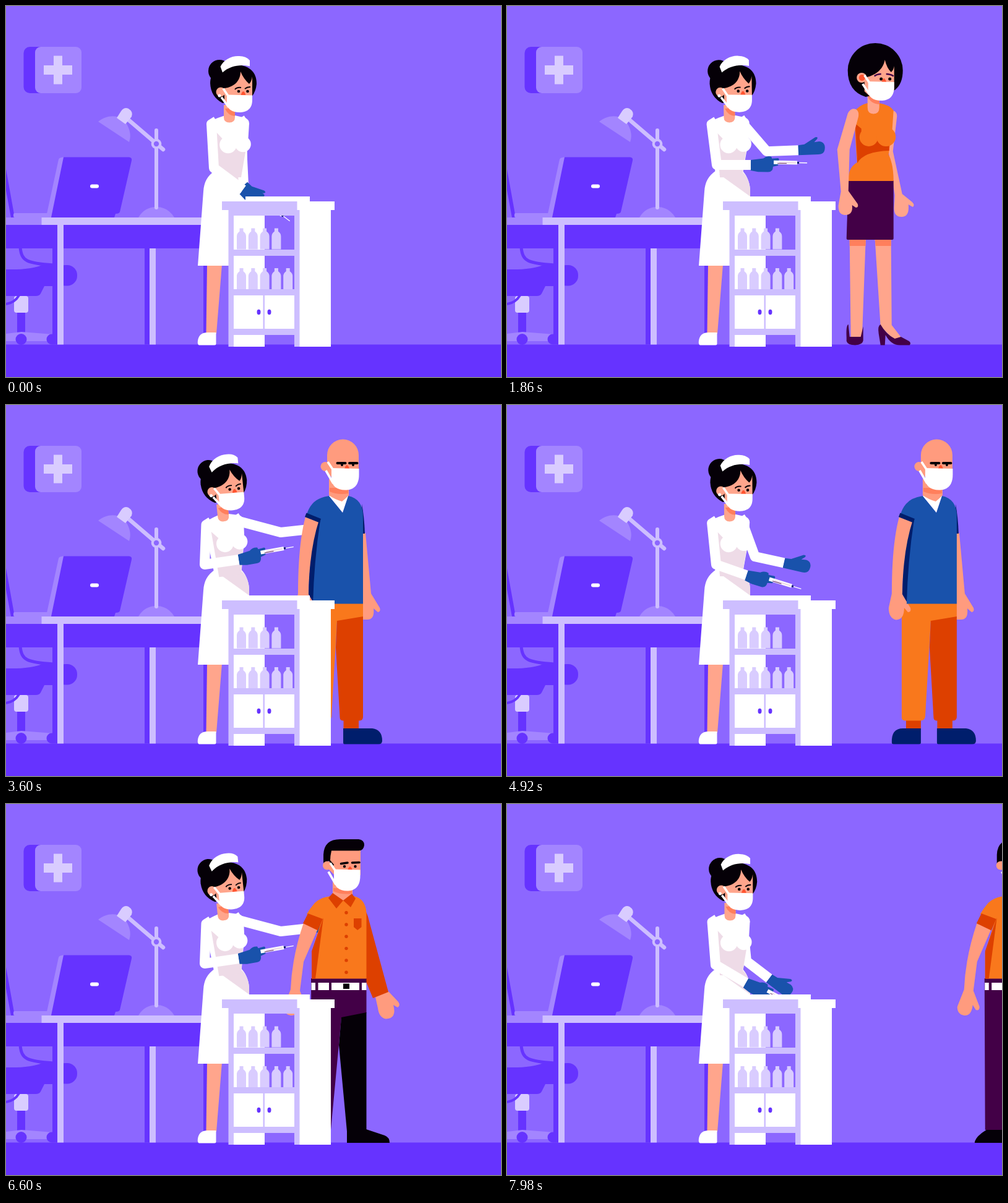
Write an HTML page that moves like this. It is 800x600 px and loops after 8000 ms.

```html
<!DOCTYPE html>
<html lang="en">
<head>
<meta charset="utf-8">
<title>Vaccination room</title>
<style>
html, body { margin: 0; width: 100%; height: 100%; overflow: hidden; background: #8c67ff; }
svg { display: block; width: 100vw; height: 100vh; }
</style>
</head>
<body>
<svg id="stage" viewBox="0 0 800 600"></svg>
<script>
const C = {
  bg: '#8c67ff', dark: '#6633ff', mid: '#a385ff', light: '#cdbeff', pale: '#d9ccff', white: '#fff',
  skin: '#ffa58c', tan: '#ff9b7e', blush: '#ff7f5c', red: '#ff5430', black: '#050007',
  blue: '#1952ab', navy: '#001e6c', orange: '#f9781c', rust: '#dd4000', plum: '#430047', pink: '#eedbe7'
};

const shape = (fill, d) => `<path d="${d}" fill="${fill}"/>`;
const line = (stroke, width, d, cap = 'butt') =>
  `<path d="${d}" fill="none" stroke="${stroke}" stroke-width="${width}" stroke-linecap="${cap}" stroke-linejoin="round"/>`;
const box = (fill, x, y, x2, y2, r = 0) =>
  `<rect x="${x}" y="${y}" width="${x2 - x}" height="${y2 - y}" rx="${r}" fill="${fill}"/>`;
const dot = (fill, x, y, r, ry = r) => `<ellipse cx="${x}" cy="${y}" rx="${r}" ry="${ry}" fill="${fill}"/>`;
const group = (id, ...parts) => `<g id="${id}">${parts.join('')}</g>`;

function mask(x, y, w, h) {
  const r = x + w, b = y + h;
  return shape(C.white, `M${x} ${y}L${r} ${y + 1}V${y + h * .3}C${r} ${b - h * .15} ${r - w * .25} ${b} ${x + w / 2} ${b}` +
    `C${x + w * .2} ${b} ${x} ${b - h * .18} ${x} ${y + h * .45}Z`) +
    line(C.white, 3.6, `M${x - 6} ${y - 10}L${x + 2} ${y + 2}M${x - 9} ${y + 4}L${x + 3} ${y + h * .7}`);
}

function nose(x, y) {
  return shape(C.red, `M${x - 4} ${y}Q${x} ${y - 12} ${x + 4} ${y}Z`);
}

function room() {
  return [
    box(C.bg, 0, 0, 800, 548), box(C.dark, 0, 547.5, 800, 600),
    // first-aid sign
    box(C.dark, 28.5, 66, 85, 141, 10), box(C.mid, 47, 66, 122, 141, 9),
    box(C.pale, 77, 80.5, 91, 126.5), box(C.pale, 61, 96, 107, 111),
    // lamp
    shape(C.mid, 'M214 342Q224 325 243 325Q262 325 272 342Z'),
    line(C.light, 6, 'M243 201V326', 'round'), line(C.light, 6.5, 'M192 179L254 232', 'round'),
    dot(C.light, 243, 223, 8.3), dot(C.bg, 243, 223, 4.2),
    shape(C.mid, 'M149 187C165 174 190 174 198 197C202 207 201 214 199 220Z'),
    shape(C.pale, 'M179 181L186 170Q191 163 198 166Q206 171 203 179L193 191Z'),
    // laptop
    shape(C.dark, 'M0 264L14 342H8L0 298Z'),
    box(C.mid, 12, 335, 74, 342, 2),
    shape(C.mid, 'M66 336L85 248Q86 244.500 94 244.500L76 342H66Z'),
    shape(C.dark, 'M93 244.500H199Q204 245 203 250L184 333Q183 336 177 336L175 342H73Z'),
    box(C.white, 136, 288.500, 150, 294.500, 3),
    // chair
    box(C.dark, 80, 419, 115, 452.500, 16),
    shape(C.dark, 'M0 426Q40 427 58 419L76 418V453H62L56 465Q54 469 48 469H0Z'),
    line(C.dark, 5, 'M23 390C25 413 34 416 76 419'),
    box(C.pale, 13, 469, 36, 496, 4), box(C.dark, 18, 496, 31, 530),
    line(C.dark, 4, 'M0 482Q14 480 21 468'),
    shape(C.mid, 'M0 530L25 527L76 531V542H0Z'),
    dot(C.dark, 24.500, 539, 9), dot(C.dark, 74, 539, 8.500),
    // desk
    box(C.dark, 0, 354, 325, 392), box(C.dark, 75, 392, 83, 547.5), box(C.dark, 224, 392, 232, 547.5),
    box(C.dark, 319, 392, 326, 547.5),
    box(C.light, 83, 354, 93, 547.5), box(C.light, 232, 392, 242, 547.5),
    box(C.mid, 0, 342, 58, 354), box(C.light, 57.500, 342, 350, 354)
  ].join('');
}

function counter() {
  const bottle = (x, y) => shape(C.pale,
    `M${x} ${y + 34}V${y + 13}Q${x} ${y + 8} ${x + 4.500} ${y + 5}V${y}h6V${y + 5}Q${x + 15} ${y + 8} ${x + 15} ${y + 13}V${y + 34}Z`);
  const row = (n, y) => Array.from({ length: n }, (_, i) => bottle(373 + 18.8 * i, y)).join('');
  return [
    box(C.white, 387, 308, 491, 317), box(C.white, 367, 338, 418, 551),
    row(4, 359.500), row(5, 424),
    box(C.white, 368, 467, 466, 523), box(C.light, 415.5, 467, 418, 523),
    dot(C.dark, 408.500, 495, 3, 4.200), dot(C.dark, 425.500, 495, 3, 4.200),
    ...[[330, 339], [394, 404], [458, 468], [522, 532]].map(([a, b]) => box(C.light, 360, a, 475, b)),
    box(C.light, 359.500, 330, 368, 551), box(C.light, 466, 330, 475, 551),
    box(C.white, 474.500, 329, 525, 551),
    box(C.light, 349, 316, 471, 330), box(C.white, 470.500, 316, 531, 330)
  ].join('');
}

function nurse() {
  const arm = id => line(C.white, 16, '').replace('<path', `<path id="${id}"`);
  const legs = [
    shape(C.skin, 'M325 418H349L340 530H323.500Z'),
    shape(C.white, 'M312 548.500Q309 548 310 541Q312 528 326 528H339.500V546Q339.500 548.500 337 548.500Z'),
    shape(C.white, 'M338 266C325 275 320 285 319 300L310 420H362L393 308V297C392 282 386 272 380 266Z'),
    shape(C.pink, 'M336 267H379C386 273 392 282 393 297V308Z')
  ].join('');
  const torso = [
    shape(C.white, 'M333 185Q344 180 354 177H370L387 181Q393 184 393 190L391 222L387 240L381 272H337L330 200Z'),
    shape(C.pink, 'M339 203L344 277H380L387 236L370 225L350 215Z'),
    dot(C.white, 359, 224.500, 13.800), dot(C.white, 383, 223.500, 12.800), box(C.white, 352, 196, 390, 225),
    shape(C.skin, 'M352 160V180Q352 188.500 361 188.500Q370 188.500 370 180V160Z'),
    shape(C.blush, 'M354 166Q359 177.500 370 178V165Z')
  ].join('');
  const head = [
    dot(C.black, 345, 105, 18),
    shape(C.black, 'M330 125C330 102 350 92 375 95C400 98 405 113 405 126Q404 138 397 147L350 157Q331 147 330 125Z'),
    shape(C.skin, 'M379 106C379 121 369 131 353 133V152L362 168H380Q397 162 398 145V114Q397 122 393 126Q384 118 379 106Z'),
    dot(C.skin, 347, 139, 7.500), dot(C.white, 345, 145, 2.500),
    dot(C.black, 376, 138, 2.300), dot(C.black, 390.500, 138, 2.300),
    line(C.black, 1.900, 'M370 135Q373 131 380 132M386 134Q390 130.500 395 131'),
    nose(383.500, 144), mask(357, 143.500, 41, 28.500),
    shape(C.white, 'M346.500 98C352 86 366 80 377 81Q388 81 394 88V97.500C378 94 362 97 350 107.500Z')
  ].join('');
  const open = 'M0-8L10-9L28-20Q33-21 31-17L26-12L34-13Q43-12 43-3Q43 8 32 8H0Z';
  const grip = 'M0-8L20-11Q26-16 33-14L34-11L44-12Q47-10 44-7L38-6Q46-4 44 0L36 2Q36 11 28 11H12L0 9Z';
  const syringe = line(C.white, 6, 'M37-5H75') + line(C.pink, 2.500, 'M46-5H73') +
    line(C.navy, 3, 'M75-5H78') + line(C.white, 1.300, 'M78-5H91') + line(C.plum, .8, 'M43-3.500H58');
  return legs +
    arm('farArm') + group('farHand', shape(C.blue, open)) +
    group('upper', torso, head) +
    group('nearHand', shape(C.blue, grip), syringe) + arm('nearArm');
}

function woman() {
  return [
    shape(C.skin, 'M563 169Q570 171 569.500 179L563 235L578 304L594 317Q599 322 595 325L588 321Q590 341 577 341Q564 341 565 325L566 306L556 235Z'),
    shape(C.skin, 'M493 378H519L513 540H495Z'), shape(C.skin, 'M534 378H560V388L561 516L578 538L566 541L543 518Z'),
    shape(C.blush, 'M493 378H519V388H493ZM534 378H560V388H535Z'),
    shape(C.plum, 'M491 515Q487 516 488 536V542Q490 548.500 502 548.500Q514 548 515 541V518L511 535H493Z'),
    shape(C.plum, 'M543 515Q538 517 540 530L543 548.500H550L551 532Q560 548.500 574 548.500H590Q593 545 589 542L576 535L566 538Q552 531 543 515Z'),
    shape(C.plum, 'M491 282H564V376Q564 378 562 378H490Q488 378 488 376Z'),
    shape(C.orange, 'M500 172Q508 160 522 157H541Q558 160 564 169L562 198L556 240Q564 256 564 283H491Q490 262 505 253L503 225Z'),
    shape(C.rust, 'M502 190L505.500 254Q516 235 557 234V215L520 205Z'),
    dot(C.orange, 524, 212, 15), dot(C.orange, 552, 211.500, 15.500), box(C.orange, 512, 184, 561, 210),
    shape(C.skin, 'M522 145V164Q522 174.500 531.500 174.500Q541 174.500 541 164V145Z'),
    shape(C.blush, 'M522 145Q526 158 541 159V145Z'),
    shape(C.skin, 'M490 174Q495 164 503 167Q509 170 507 180L493 232L491 299L506 320Q508 326 503 326L497 322Q499 338 486 338Q474 338 475 322L479 300L473 232Z'),
    shape(C.black, 'M490 104A44.500 44 0 0 1 579 104Q579 126 566 136L519 147Q490 138 490 104Z'),
    shape(C.skin, 'M550 87C547 104 533 113 517 116V138L530 150H548Q562 147 565 135V97Q564 104 560 107Q553 100 550 87Z'),
    dot(C.skin, 512.500, 116, 8), dot(C.red, 513, 116, 5),
    dot(C.black, 544, 118, 2.500), dot(C.black, 558, 118, 2.500),
    line(C.plum, 2.500, 'M533 113.500Q537 110 544 110M552 110Q559 110 564 113.500'),
    nose(548.500, 123), mask(523, 122, 42, 31)
  ].join('');
}

function baldMan() {
  return [
    shape(C.tan, 'M576 207H581L590 305L604 328Q606 334 601 335L594 329Q596 347 584 347H576Z'),
    box(C.rust, 495, 508, 519, 525), box(C.rust, 545.500, 508, 570, 525),
    shape(C.navy, 'M472 546Q471 523 490 523H519V546Q519 548.500 516 548.500H475Q472 548.500 472 546ZM545 523H592Q608 525 608 543Q608 548.500 602 548.500H547Q545 548.500 545 546Z'),
    shape(C.orange, 'M488 321H577V343L535 350L526 504Q525 510.500 518 510.500H493Q488 510 488 505Z'),
    shape(C.rust, 'M535 349L577 342V504Q577 510.500 571 510.500H544Q539.500 510 539.500 505L533 392Z'),
    shape(C.tan, 'M484 181Q472 225 472 305L467 328Q467 345 479 347.500Q492 347 492 328L498 335Q504 335 502 328L489 306Q490 240 507 190Z'),
    shape(C.navy, 'M575 160Q579 180 580 208H576Z'),
    shape(C.navy, 'M506 186Q490 235 489 306L496 318L506 300L515 190Z'),
    shape(C.blue, 'M522 147Q503 150 495 160Q489 167 486 177L508 186Q498 250 496 321.500H577V180Q577 152 553 147L544 174Z'),
    shape(C.navy, 'M485.500 174.500L509 184L507 190.500L483 181Z'),
    shape(C.white, 'M522 147L544 174L553 147Z'),
    shape(C.tan, 'M522 120H554V146Q548 152 543 156Q532 153 522 146Z'),
    shape(C.blush, 'M523 134H553V143Q537 146 523 140Z'),
    shape(C.tan, 'M519 81A25.500 25.500 0 0 1 570 81V118H527L519 108Z'), dot(C.tan, 516, 99.500, 7.500),
    dot(C.black, 543, 97, 2), dot(C.black, 561, 97, 2),
    line(C.black, 4, 'M535.500 94H548.500M555 94H567.500', 'round'),
    nose(551, 103), mask(526, 102, 44.500, 35.500)
  ].join('');
}

function shirtMan() {
  return [
    shape(C.tan, 'M597 312L618 303L634 320Q638 326 633 329L626 325Q632 347 614 347.500Q603 346 601 330Z'),
    shape(C.rust, 'M580 172Q584 177 586 186L618 304L593 314L581 285Z'),
    shape(C.black, 'M477 548Q478 538 496 527H525V548ZM551 526H582L612 536Q620 539 620 548H551Z'),
    shape(C.plum, 'M493 282H582.500V338L542 346L525 527H494Z'),
    shape(C.black, 'M542 345L582.500 337V529H551L538 390Z'),
    ...[[493.500, 500], [504.500, 522], [526, 571], [575, 582.500]].map(([a, b]) => box(C.white, a, 289, b, 301)),
    box(C.black, 545, 290.500, 555, 299),
    shape(C.tan, 'M481 192L504 202L481 255L475 302L485 328Q485 335 479 333L474 325Q472 343 460 342Q449 340 449 328L460 300Q462 248 481 192Z'),
    shape(C.orange, 'M525 149Q508 151 499 160Q492 168 486 178L510 188L494 240V282.500H582.500V176Q581 153 562 149Z'),
    shape(C.rust, 'M513 184L494 238V282.500H500Z'),
    shape(C.rust, 'M488 177L512 186L504 204.500L480 193Z'),
    shape(C.tan, 'M528 125H560V146L545 156L528 146Z'), shape(C.blush, 'M529 136H559V145Q541 147 529 141Z'),
    shape(C.rust, 'M528 144L521 152L534 169L545 156ZM559 145L545 156L557 167L565 153Z'),
    ...[0, 1, 2, 3, 4, 5].map(i => dot(C.rust, 550, 175.700 + 19.300 * i, 2.700)),
    shape(C.rust, 'M562 185H574.500V199L568.200 204L562 199Z'),
    shape(C.tan, 'M522 74H573V115H531L522 106Z'),
    shape(C.black, 'M513 96V82Q514 57 540 57H570Q579 58 579 66.500Q578 75.500 570 75.500H526Q524 84 524 91L530 98L528 102L522 92Z'),
    dot(C.tan, 519, 99.500, 7),
    dot(C.black, 547, 101, 2.200), dot(C.black, 564.500, 101, 2.200),
    line(C.black, 3.600, 'M541.500 96.500L552 95M559.500 95L571 94.500', 'round'),
    nose(556, 107), mask(530, 105.500, 42.500, 35)
  ].join('');
}

document.getElementById('stage').innerHTML = room() + nurse() +
  [woman, baldMan, shirtMan].map((draw, i) => group('patient' + i, draw())).join('') + counter();

const el = id => document.getElementById(id);
const set = (id, name, value) => el(id).setAttribute(name, value);

// time, lean, near elbow x y, near wrist x y, near angle, far elbow x y, far wrist x y, far angle
const REST = [0, 336, 262, 383, 297, 37, 382, 248, 384, 290, 50];
const REACH = [1, 321, 258, 376, 250, -10, 444, 206, 490, 201, -5];
const JAB = [.95, 330, 258, 394, 247, -10, 444, 206, 490, 201, -5];
const KEYS = [
  [0, ...REST], [600, ...REACH], [810, ...REACH], [990, ...JAB], [1290, ...JAB], [1470, ...REACH],
  [1620, .8, 325, 258, 380, 251, -8, 441, 211, 488, 206, -5],
  [1860, .16, 339, 257, 394, 257, 1, 420, 235, 471, 233, -2],
  [1920, .1, 338, 258, 387, 275, 17, 401, 245, 448, 255, 13],
  [1980, .05, 337, 260, 386, 289, 28, 387, 254, 424, 282, 37],
  [2220, ...REST], [3000, ...REST]
];

// monotone cubic interpolation through the key poses
function pose(t) {
  const i = Math.max(0, KEYS.findIndex((k, n) => n < KEYS.length - 1 && t < KEYS[n + 1][0]));
  const a = KEYS[i], b = KEYS[i + 1], h = b[0] - a[0], u = (t - a[0]) / h;
  return a.slice(1).map((_, n) => {
    const c = n + 1;
    const slope = j => KEYS[j] && KEYS[j + 1] ? (KEYS[j + 1][c] - KEYS[j][c]) / (KEYS[j + 1][0] - KEYS[j][0]) : 0;
    const tangent = j => {
      const p = slope(j - 1), q = slope(j);
      return p * q > 0 ? 2 * p * q / (p + q) : 0;
    };
    const u2 = u * u, u3 = u2 * u;
    return a[c] * (2 * u3 - 3 * u2 + 1) + b[c] * (3 * u2 - 2 * u3) +
      h * (tangent(i) * (u3 - 2 * u2 + u) + tangent(i + 1) * (u3 - u2));
  });
}

const HIP = [355, 274];
function lean(x, y, degrees) {
  const r = degrees * Math.PI / 180, dx = x - HIP[0], dy = y - HIP[1];
  return [HIP[0] + dx * Math.cos(r) - dy * Math.sin(r), HIP[1] + dx * Math.sin(r) + dy * Math.cos(r)];
}

function limb(name, shoulder, ex, ey, wx, wy, angle) {
  const [sx, sy] = shoulder;
  set(name + 'Arm', 'd', `M${sx + 8} ${sy - 5}L${sx} ${sy}L${ex} ${ey}L${wx} ${wy}`);
  set(name + 'Hand', 'transform', `translate(${wx} ${wy}) rotate(${angle})`);
}

function patientOffset(t) {
  const gap = t < 1000 ? Math.max(0, 570 - t) : Math.max(0, t - 1756);
  return Math.min(500, (gap * .0742) ** 2);
}

function render(ms) {
  const t = ms % 8000, visit = Math.floor(t / 3000), local = t % 3000;
  const [k, ...j] = pose(local), tilt = -6 * k;
  set('upper', 'transform', `rotate(${tilt} ${HIP})`);
  limb('near', lean(332, 191, tilt), ...j.slice(0, 5));
  limb('far', lean(381, 189, tilt), ...j.slice(5));
  for (let i = 0; i < 3; i++) {
    set('patient' + i, 'transform', `translate(${patientOffset(local)} 0)`);
    set('patient' + i, 'display', i === visit ? 'inline' : 'none');
  }
}

const start = performance.now();
function tick() {
  render(performance.now() - start);
  requestAnimationFrame(tick);
}
tick();
</script>
</body>
</html>
```
